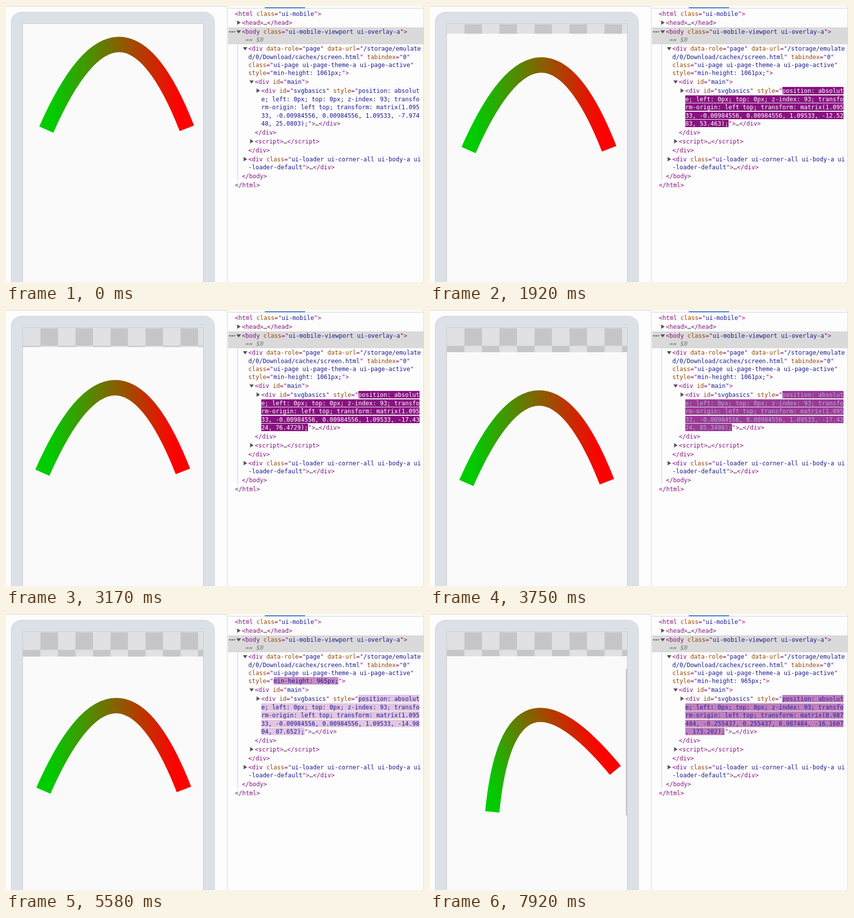
Animation, 840 px wide and 556 px high, one loop 8000 ms. Source, as an HTML page:

```html
<!DOCTYPE html>
<html lang="en">
<head>
<meta charset="utf-8">
<title>Dragging an SVG arc</title>
<style>
  html, body { margin: 0; width: 100%; height: 100%; overflow: hidden; background: #fdfdfd; }
  svg { position: absolute; left: 0; top: 0; }
  .line { position: absolute; font: 12px/16px "DejaVu Sans Mono", monospace; white-space: pre; color: #881280; }
  .line i { font-style: normal; color: #994500; }
  .line b { font-weight: normal; color: #1a1a96; }
  .line em { color: #7c7c7c; }
  .line s { text-decoration: none; color: #333; }
  .style, .height { padding-top: 1px; border-radius: 1px; }
</style>
</head>
<body>
<svg width="840" height="556">
  <defs>
    <linearGradient id="ramp">
      <stop offset="5%" stop-color="#00cc00"/>
      <stop offset="95%" stop-color="#ff0000"/>
    </linearGradient>
    <pattern id="checks" x="34" y="37" width="70.4" height="70.4" patternUnits="userSpaceOnUse">
      <path d="M35.2 0h35.2v35.2h-35.2zM0 35.2h35.2v35.2H0z" fill="#c6c6c8"/>
    </pattern>
  </defs>
  <rect x="10.5" y="12.5" width="408.5" height="600" rx="20" fill="#dce0e7" stroke="#cfd3d6"/>
  <rect x="33.5" y="35.5" width="363" height="560" fill="#fafafa" stroke="#c9cccf"/>
  <g id="gap">
    <rect x="34" y="36" width="362" fill="#e0e1e4"/>
    <rect x="34" y="37" width="362" fill="url(#checks)"/>
  </g>
  <rect id="scrollbar" x="393.5" y="110" width="2.5" height="296" fill="#c8c8c8"/>
  <path id="arc" d="M56.5 209Q223-160.5 363.5 209" fill="none" stroke="url(#ramp)" stroke-width="33.7"/>
  <path d="M0 .5H444M446 4.5H840" stroke="#d0d0d0"/>
  <path d="M444.5 0V556" stroke="#d3d3e2"/>
  <path d="M839.5 0V556" stroke="#d4d4d4"/>
  <path d="M520 3.5H601" stroke="#3272c0" stroke-width="2"/>
  <rect x="446" y="43" width="394" height="34" fill="#dadada"/>
  <path d="M465.5 77V351" stroke="#d4e1f6" stroke-width="2"/>
  <path d="M448.5 52h3m1.5 0h3m1.5 0h3" stroke="#666" stroke-width="2.5"/>
  <path id="arrows" fill="#555"/>
</svg>
<script>
const $ = id => document.getElementById(id);

// Each digit is the indent; + closed, - open, > no arrow, _ wrapped line.
// [..] is a value; # and % change over time.
const tree = `0><html class="[ui-mobile]">
1+<head>…</head>
1-<body class="[ui-mobile-viewport ui-overlay-a]">
1_ == $0
2-<div data-role="[page]" data-url="[/storage/emulate]
2_[d/0/Download/cachex/screen.html]" tabindex="[0]"
2_class="[ui-page ui-page-theme-a ui-page-active]"
2_style="%">
3-<div id="[main]">
4+<div id="[svgbasics]" style="#
4_#
4_#
4_#
4_#">…</div>
3></div>
3+<script>…<\/script>
2></div>
2+<div class="[ui-loader ui-corner-all ui-body-a ui]
2_[-loader-default]">…</div>
1></body>
0></html>`;

const markup = text => text
  .replace(/</g, '&lt;')
  .replace(/([\w-]+)(?==")/g, '<i>$1</i>')
  .replace(/\[(.*?)\]/g, '<b>$1</b>')
  .replace('…', '<s>…</s>')
  .replace('== $0', '<em>== $$0</em>')
  .replace('#', '<b class="style"></b>')
  .replace('%', '<b class="height"></b>');

let arrows = '', lineY = -2.2;
for (const [indent, kind, ...rest] of tree.split('\n')) {
  lineY += kind === '_' ? 16.4 : 18;
  const x = Math.round(460.3 + 13.2 * indent), y = Math.round(lineY);
  const el = document.createElement('div');
  el.className = 'line';
  el.style.left = x + 'px';
  el.style.top = y - 8 + 'px';
  el.innerHTML = markup(rest.join(''));
  document.body.append(el);
  if (kind === '+') arrows += `M${x - 9.5} ${y - 5}l7 4.5l-7 4.5z`;
  if (kind === '-') arrows += `M${x - 11} ${y - 3}h9l-4.5 6.5z`;
}
$('arrows').setAttribute('d', arrows);
const styleParts = [...document.querySelectorAll('.style')];
const heightParts = [...document.querySelectorAll('.height')];

// A pose: matrix cosine, sine, x, y, and the strip uncovered above the page
const COS = 1.09533, SIN = .00984556;
const home = [COS, SIN, -7.97448, 25.0803, 0];
// Finger moves: first tick, last tick, pose reached
const moves = [
  [17, 22, [COS, SIN, -12.5283, 53.463, 22]],
  [23, 27, [COS, SIN, -17.4324, 58.7191, 26]],
  [30, 42, [COS, SIN, -17.4324, 85.3498, 49]],
  [48, 54, [COS, SIN, -14.9804, 87.652, 49.5]],
  [54, 60, [COS, SIN, -14.9804, 93.5, 49.5]],
  [75, 83, [1.00496, .213116, -17.8525, 162.175, 49.5]],
  [83, 94, [.9569, .3295, -13.2, 192.5, 49]]
];
// Spans in which the panel follows the finger
const edits = [[17, 27], [30, 42], [48, 54], [75, 87]];
const RESIZE = 58, SCROLLBAR = 75, FADE = 17, LAG = 1.5;

const clamp = v => Math.min(1, Math.max(0, v));

const poseAt = tick => moves.reduce((pose, [from, to, goal]) => {
  const k = clamp((tick - from) / (to - from));
  return pose.map((v, i) => v * (1 - k) + goal[i] * k);
}, home);

// A changed value flashes purple and fades back
function flash(parts, age) {
  const k = clamp(1 - age / FADE), white = clamp(2 * k - 1);
  const mix = c => c + (255 - c) * white;
  for (const el of parts) {
    el.style.background = `rgba(136, 18, 128, ${k})`;
    el.style.color = `rgb(${mix(26)}, ${mix(26)}, ${mix(150)})`;
  }
}

function draw(tick) {
  const [cos, sin, x, y, strip] = poseAt(tick - LAG);
  $('arc').setAttribute('transform',
    `translate(34 ${36 + strip}) scale(.84) matrix(${[cos, -sin, sin, cos, x, y]})`);
  const [under, checks] = $('gap').children;
  under.setAttribute('height', strip);
  checks.setAttribute('height', Math.max(0, strip - 1));
  $('scrollbar').style.display = tick >= SCROLLBAR ? '' : 'none';

  const edit = edits.findLast(e => e[0] <= tick);
  const edited = edit ? Math.min(tick, edit[1]) : -FADE;
  const [a, b, tx, ty] = poseAt(edited);
  const matrix = [a, -b, b, a, tx, ty].map(v => +v.toPrecision(6)).join(', ');
  const css = 'position: absolute; left: 0px; top: 0px; z-index: 93; ' +
    `transform-origin: left top; transform: matrix(${matrix});`;
  styleParts.forEach((el, i) => {
    el.textContent = css.slice(Math.max(0, 44 * i - 27), 44 * i + 17);
  });
  flash(styleParts, tick - edited);

  const resized = tick >= RESIZE;
  heightParts[0].textContent = `min-height: ${resized ? 965 : 1061}px;`;
  flash(heightParts, resized ? tick - RESIZE : FADE);
}

// Twelve pictures a second, 96 in a loop
const start = performance.now();
function loop() {
  const t = (performance.now() - start) % 8000;
  draw(Math.floor((t + 5) * 12 / 1000) % 96);
  requestAnimationFrame(loop);
}
loop();
</script>
</body>
</html>
```
